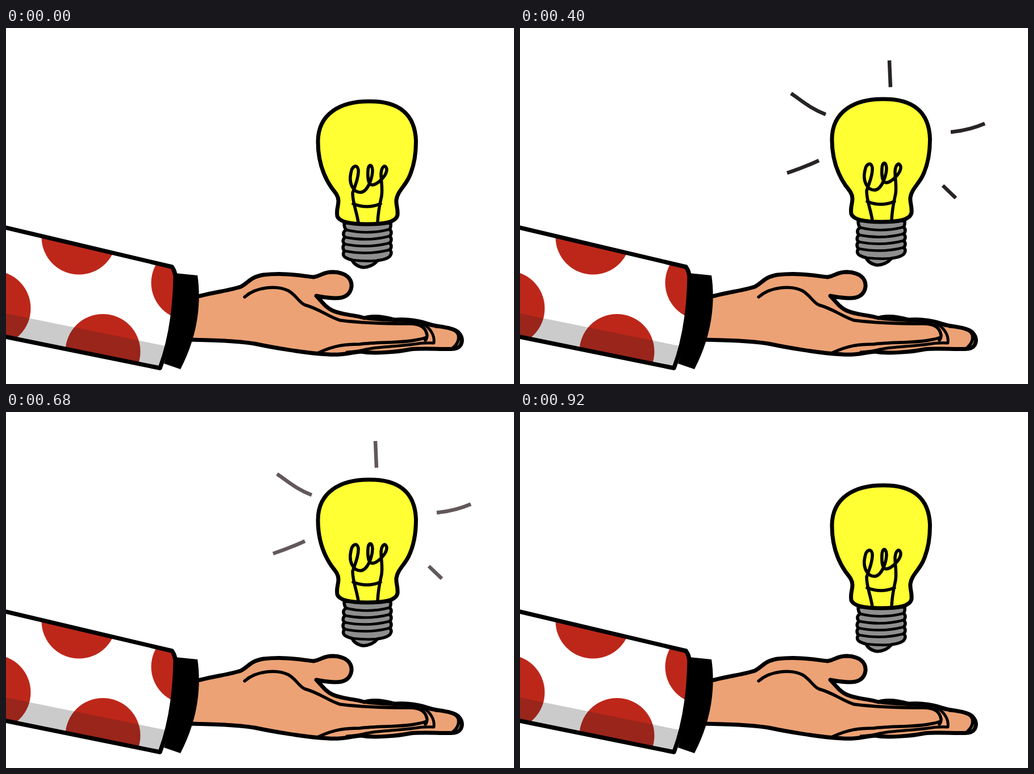
These frames come from a looping animation (894 px wide and 626 px high, 960 ms). An HTML page:

```html
<!DOCTYPE html>
<html lang="en">
<head>
<meta charset="utf-8">
<title>Bright idea</title>
<style>
  html, body { margin: 0; width: 100%; height: 100%; overflow: hidden; background: #fff; }
  svg { display: block; width: 100vw; height: 100vh; }
  .line { fill: none; stroke: #000; stroke-width: 5.5; stroke-linecap: round; stroke-linejoin: round; }
  .outline { stroke: #000; stroke-width: 7; stroke-linejoin: round; }
</style>
</head>
<body>
<svg viewBox="0 0 894 626">
  <defs>
    <path id="sleeve" d="M-20 346.5 L292 420 Q299 430 298 442 Q296 532 271 598 L-20 539 Z"/>
    <clipPath id="inSleeve"><use href="#sleeve"/></clipPath>
  </defs>

  <g id="hand">
    <path class="outline" fill="#eca275" d="M320 475.500 L342 471 C370 464 395 461 413 455 C426 449 429 438 453 434
      C490 430 515 435 541 438 C556 436 556 429 576 429 C599 430 609 441 608 455 C606 470 594 476 577 475
      Q560 474 546 471 C556 481 562 491 575 497 C593 505 612 504 631 510 C646 505 666 508 684 513
      C706 511 731 515 747 522 C768 526 787 527 796 535 C807 547 803 562 789 564 C769 566 736 562 712 565
      C688 570 645 573 625 569 C603 571 591 576 568 574 C528 572 470 562 437 555 C403 550 370 549 320 548 Z"/>
    <g class="line" stroke-linecap="round">
      <path d="M420 473 C440 455 476 452 497 462 C511 470 516 483 526 487 C552 494 568 508 588 514
        C620 518 670 520 710 520 C731 520 739 528 741 540 Q741 546 738 549"/>
      <path d="M550 571 C578 558 597 556 622 556 C655 552 695 554 719 549 Q732 547 740 544"/>
      <path style="stroke-width:5" d="M600 570 Q620 569 634 565 C655 560 690 560 718 556 Q735 553 753 554 C755 540 746 526 732 520"/>
      <path d="M631 510 C660 515 705 513 738 519 Q750 520 757 525"/>
      <path d="M783 529 C802 534 799 552 787 562"/>
    </g>
  </g>

  <g id="arm">
    <use href="#sleeve" fill="#fff"/>
    <g clip-path="url(#inSleeve)">
      <g fill="#bd271a">
        <circle cx="128.500" cy="367.500" r="66"/>
        <circle cx="-22.500" cy="493" r="66"/>
        <circle cx="170.500" cy="569" r="66"/>
        <circle cx="321" cy="448" r="65.500"/>
      </g>
      <path fill="#231f20" fill-opacity=".23" d="M0 502 L300 563 V626 H0 Z"/>
    </g>
    <use href="#sleeve" fill="none" class="outline" style="stroke-width:7.500"/>
    <path d="M297 431 L337 435 C343 475 341 535 307 600 L278 590 C293 540 299 490 297 431 Z"/>
  </g>

  <g id="bulb">
    <g class="outline" fill="#8f8f8f" style="stroke-width:5.500">
      <path d="M595 343 Q595 352 599 355 C592 358 593 365 597 368 C592 371 592 377 596 380
        C592 383 592 389 596 392 C592 396 593 401 598 404 Q604 407 609 408 Q614 419 629 421
        Q645 420 654 409 Q669 407 675 402 C679 397 679 393 675 390 C679 387 679 381 675 378
        C679 375 679 369 675 366 C679 363 679 357 675 354 Q678 350 677 343 Z"/>
      <g class="line" style="stroke-width:4.500">
        <path d="M599 355 Q637 364 675 354"/>
        <path d="M597 368 Q637 376 675 366"/>
        <path d="M596 380 Q637 388 675 378"/>
        <path d="M596 392 Q637 400 675 390"/>
        <path d="M609 408 Q635 411 654 409"/>
      </g>
    </g>
    <path class="outline" fill="#ffff33" d="M641 129 C590 128 549 150 549 200 C549 238 562 265 573 281
      C581 291 585 296 585 304 C585 315 581 318 583 331 C587 342 610 345 635 345 C665 345 686 342 689 329
      C690 316 686 312 687 302 C689 288 700 280 708 265 C717 247 721.500 225 721.500 199 C720 150 690 129 641 129 Z"/>
    <g class="line">
      <path d="M620 342 C617 322 610 308 610 290 C615 276 621 261 620 249 C618 239 609 242 607 255
        C603 272 610 289 624 289 C637 288 645 263 645 250 C644 237 637 240 637 252 C636 268 639 276 645 276
        C654 275 671 259 670 248 C668 239 661 243 660 256 C660 272 664 286 660 300 Q655 322 654 342"/>
      <path d="M611 309 Q635 319 659 309"/>
    </g>
    <g id="rays" fill="none" stroke-width="6.500">
      <path d="M650 61 L652 108"/>
      <path d="M477 119 C495 131 510 145 538 156"/>
      <path d="M470 259 Q500 249 526 237"/>
      <path d="M758 187 Q790 184 818 172"/>
      <path d="M744 281 L767 303"/>
    </g>
  </g>
</svg>
<script>
  const bulb = document.getElementById("bulb");
  const rays = document.getElementById("rays");
  const STEP = 40, STEPS = 24, LAST = 23, LIFT = 12;

  // Two linear hops; the second one lands a step early.
  const hop = n => n < 18 ? 1 - Math.abs(1 - (n % 12) / 6) : (LAST - n) / 5;
  const glow = n => Math.sin(Math.PI * n / LAST);

  function draw(now) {
    const n = Math.floor(now / STEP) % STEPS;
    bulb.setAttribute("transform", `translate(0 ${-LIFT * hop(n)})`);
    rays.style.stroke = `hsl(354 5% ${100 - 87 * glow(n)}%)`;
    requestAnimationFrame(draw);
  }
  draw(performance.now());
</script>
</body>
</html>
```
